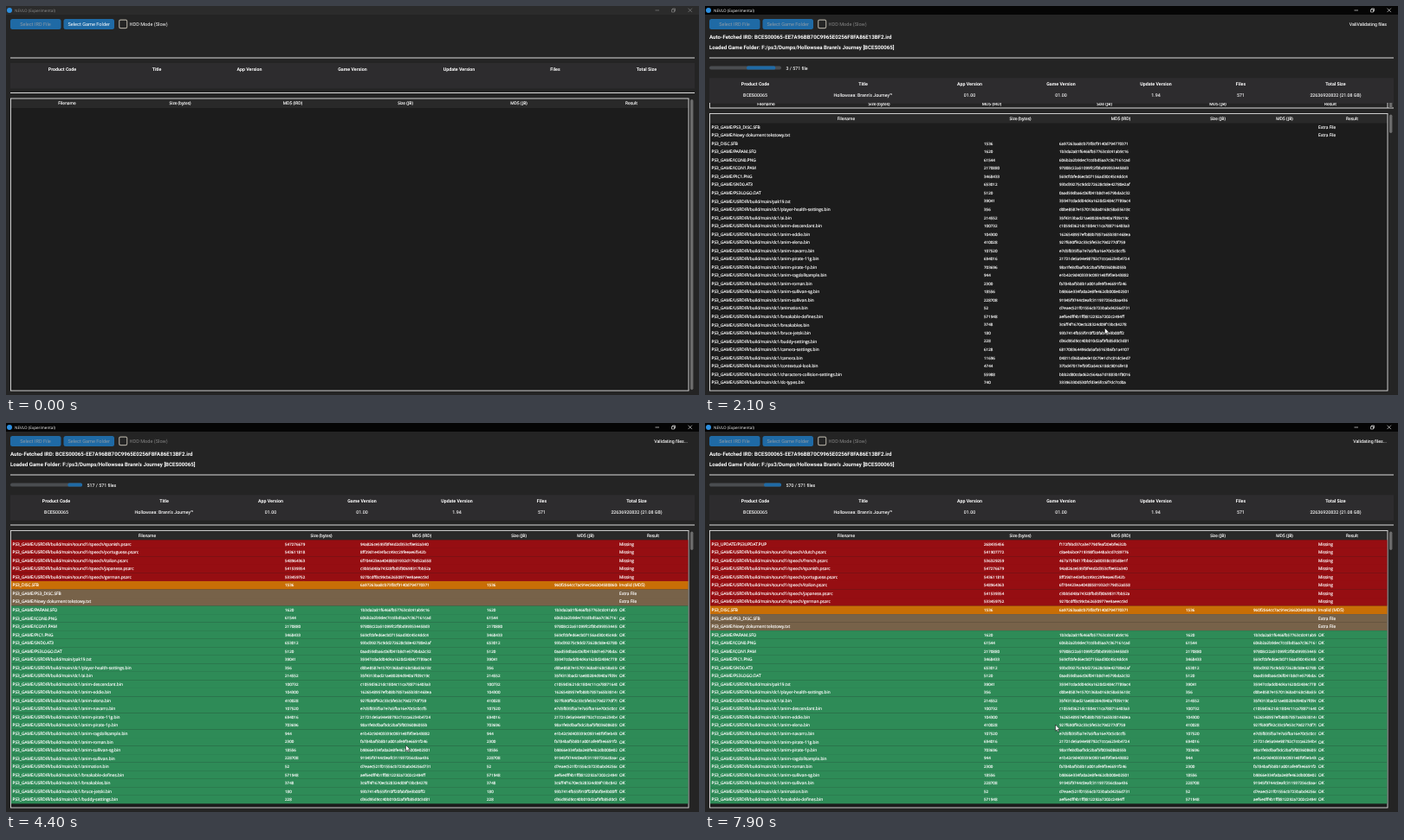
An HTML page for the animation above (8000 ms loop, 800x450 px).

```html
<!DOCTYPE html>
<html lang="en">
<head>
<meta charset="utf-8">
<title>Dump validator</title>
<style>
html, body { margin: 0; width: 100%; height: 100%; overflow: hidden; background: #242424; }
svg.stage { display: block; width: 100vw; height: 100vh; }
text { fill: #fff; text-rendering: geometricPrecision; white-space: pre; }
.ui { font: 5.6px Roboto, sans-serif; }
.small { font: 5.3px Roboto, sans-serif; }
.head { font: bold 5.3px Roboto, sans-serif; }
.info { font: bold 6.15px Roboto, sans-serif; }
.cell { font: 4.8px "Open Sans", "Noto Sans", sans-serif; }
.num { font: 4.52px "Open Sans", "Noto Sans", sans-serif; }
.side { font: 4.6px "Open Sans", "Noto Sans", sans-serif; }
.cell, .num { stroke: #fff; stroke-width: .16px; }
.small { stroke: #fff; stroke-width: .08px; }
.dim { fill: #8c9aa6; }
.grey { fill: #858585; }
.soft { fill: #d0d0d0; }
.mid { text-anchor: middle; }
.end { text-anchor: end; }
.control { fill: #333; }
.unthemed .control { fill: #fff; }
.unthemed .late { display: none; }
</style>
</head>
<body>
<svg class="stage" viewBox="0 0 800 450"></svg>
<script>
const LOOP = 8000, STEP = 100, ROW = 9.53, VISIBLE = 32;
const COLORS = { missing: '#960e12', invalid: '#c86e06', extra: '#776249', ok: '#2e8b57' };
const stage = document.querySelector('svg');

function add(parent, tag, attrs = {}) {
  const el = document.createElementNS('http://www.w3.org/2000/svg', tag);
  for (const key in attrs) el.setAttribute(key, attrs[key]);
  return parent.appendChild(el);
}
const group = (parent, attrs) => add(parent, 'g', attrs);
const box = (parent, x, y, width, height, fill, rx = 0) =>
  add(parent, 'rect', { x, y, width, height, fill, rx });
const path = (parent, d, stroke, width = .6, fill = 'none') =>
  add(parent, 'path', { d, stroke, fill, 'stroke-width': width });

// y is the middle of the capitals
function label(parent, x, y, words, cls) {
  const el = add(parent, 'text', { x, y, dy: '.36em', class: cls });
  el.textContent = words;
  return el;
}
const show = (el, on) => { el.style.display = on ? '' : 'none'; };

// piecewise linear value over time
function at(t, keys) {
  if (t <= keys[0][0]) return keys[0][1];
  for (let i = 1; i < keys.length; i++) {
    const [t0, a] = keys[i - 1], [t1, b] = keys[i];
    if (t <= t1) return a + (b - a) * (t - t0) / (t1 - t0);
  }
  return keys[keys.length - 1][1];
}

// --- window frame and toolbar
box(stage, 0, 0, 800, 450, '#242424');
const titleBar = box(stage, 0, 0, 800, 10, '#2b2b2b');
add(stage, 'circle', { cx: 4, cy: 5, r: 3, fill: '#2d8fe0' });
const titleText = label(stage, 10, 5, 'NEVLO (Experimental)', 'side');
const winButtons = path(stage, 'M749.5 5h4.5M768.5 4h3v3h-3zM769.5 4v-1h3v3h-1M787.5 2.7l4.4 4.4m0-4.4l-4.4 4.4', '#999');

box(stage, 5, 15, 58.5, 12, '#1f6aa5', 2.5);
const folderButton = box(stage, 66.5, 15, 58.5, 12, '#1f6aa5', 2.5);
label(stage, 34, 21, 'Select IRD File', 'ui mid dim');
const folderText = label(stage, 95.7, 21, 'Select Game Folder', 'ui mid');
add(stage, 'rect', { x: 130.7, y: 16.2, width: 9, height: 9.5, rx: 1.6, fill: 'none', stroke: '#a5a197', 'stroke-width': 1.2 });
const hddText = label(stage, 142.5, 21, 'HDD Mode (Slow)', 'ui');

// --- shared layout pieces
const INFO = ['Product Code', 'Title', 'App Version', 'Game Version', 'Update Version', 'Files', 'Total Size'];
const COLUMNS = ['Filename', 'Size (bytes)', 'MD5 (IRD)', 'Size (JB)', 'MD5 (JB)', 'Result'];
const headings = (parent, words, xs, y, cls) => words.forEach((w, i) => label(parent, xs[i], y, w, cls + ' mid'));

function layout(parent, y, infoXs, columnXs) {
  box(parent, 5, 59.5, 790, 1, '#dcdcdc');
  box(parent, 5, y.panel, 790, 29.5, '#2d2c2e');
  headings(parent, INFO, infoXs, y.panel + 7, 'head');
  box(parent, 5, y.line, 790, 1, '#dcdcdc');
  box(parent, 5.5, y.table, 782.5, 445 - y.table, '#1c1c1c');
  box(parent, 5.5, y.table, 782.5, 11, '#292929');
  headings(parent, COLUMNS, columnXs, y.table + 5.7, 'cell');
  add(parent, 'rect', { x: 5.5, y: y.table, width: 782.5, height: 445 - y.table, fill: 'none', stroke: '#dedede', 'stroke-width': .9 });
  box(parent, 790, y.table + 1, 3.4, y.thumb, '#6a6a6a', 1.7);
}

const OLD_COLUMNS = [70.5, 201, 331, 461, 592, 722];
const before = group(stage);
layout(before, { panel: 66, line: 100, table: 107, thumb: 336 },
  [65, 174, 281, 400, 523, 634, 739.5], OLD_COLUMNS);

const after = group(stage);
const INFO_XS = [58, 182.5, 305.5, 411, 520.5, 618.5, 728];
layout(after, { panel: 83.3, line: 117.5, table: 124.5, thumb: 21.5 },
  INFO_XS, [163, 364, 480, 592, 669, 747]);
headings(after, ['BCES00065', 'Hollowsea: Brann\'s Journey™', '01.00', '01.00', '1.94', '571', '22636920832 (21.08 GB)'],
  INFO_XS, 103.5, 'small');
label(after, 5, 36, 'Auto-Fetched IRD: BCES00065-EE7A96BB70C9965E0256F8FA86E13BF2.ird', 'info');
label(after, 5, 48, 'Loaded Game Folder: F:/ps3/Dumps/Hollowsea Brann\'s Journey [BCES00065]', 'info');
const status = label(after, 787, 21, '', 'small end');
box(after, 5, 69.6, 83, 4, '#4a4d50', 2);
const bar = box(after, 5, 69.6, 0, 4, '#1f6aa5', 1.6);
const counter = label(after, 93.5, 71.6, '', 'small');

// stale headings left for a moment while the table moves down
const stale = add(after, 'svg', { x: 0, y: 112, width: 800, height: 6 });
headings(stale, COLUMNS, OLD_COLUMNS, .8, 'cell');
box(stale, 790, 0, 3.4, 6, '#6a6a6a');
path(stale, 'M5.5 0v6M788 0v6', '#dedede', .9);

// --- table rows: name, size, hash
const MAIN = 'PS3_GAME/USRDIR/build/main/';
const parse = (prefix, kind, lines) => lines.trim().split('\n').map(line => {
  const [name, size, hash] = line.trim().split(' ');
  return { name: prefix + name, size, hash, kind };
});

const missing = [
  ...parse('', 'missing', 'PS3_UPDATE/PS3UPDAT.PUP 268435456 f172f9bd37ca3e779dfeaf20ebfe632b'),
  ...parse(MAIN + 'sound1/speech/', 'missing', `
    dutch.psarc 541907772 c8aeb6bce719398f3a448a3cd7c89776
    french.psarc 536329259 467a75f9d17fbb6c2a80338cc85d8e1f
    spanish.psarc 547276679 94a826ce595f8f44d2d353cf9e92a340
    portuguese.psarc 543611818 8ff29d1e434facc49cc29feeae6f542b
    italian.psarc 548964363 6f704423ea40488581932d179d52a558
    japanese.psarc 541539354 c3bb5d48a74328fbd5f80698317bb52a
    german.psarc 533459752 9270cdff8c99cb62650977ee9aeecc9d`)];
const disc = parse('', 'invalid', 'PS3_DISC.SFB 1536 6a97263aa8cb73f8cf9140d794770371');
const extra = ['PS3_DISC.SFB', 'Nowy dokument tekstowy.txt'].map(n => ({ name: 'PS3_GAME/' + n, kind: 'extra' }));
const good = [
  ...parse('PS3_GAME/', 'ok', `
    PARAM.SFO 1620 1b3da2a81f6466fb57763cdc41ab9c16
    ICON0.PNG 61544 606b2a2b9dec7ccdbd5aa7c367161cad
    ICON1.PAM 2170880 97808c22a51099fc2f8bd993534458d3
    PIC1.PNG 3468433 569cfcbfed6ecb07156ad30c45c4ddc4
    SND0.AT3 653012 93bd39275c9dd272628cb8e42780e2af
    PS3LOGO.DAT 5120 0aad59dba6c06f041b8d1e579bda2c32`),
  ...parse(MAIN, 'ok', 'pak19.txt 39041 35947cdadd04d4a1620d2484c7789ac4'),
  ...parse(MAIN + 'dc1/', 'ok', `
    player-health-settings.bin 356 d0be8587e15701368a0168c58a55618c
    ai.bin 214552 35f4313bad21ae80284d940a7fd9c19c
    anim-descendant.bin 100732 c1059d3621dc1804c11ca788716403a3
    anim-eddie.bin 104300 1626548957efb88b7857a65b381468ea
    anim-elena.bin 410028 927f690ff42c33c5fe53c79d277df759
    anim-navarro.bin 107520 e7d5f835f5a7e7a5fba16e70c5c0ccf5
    anim-pirate-11g.bin 694016 21721de5a94e98792c7ccca6234b4724
    anim-pirate-1p.bin 703696 98a1fe8dfaaf3dc2baf5f0036086055b
    anim-ragdollsample.bin 944 e1b42c9d403339c0931e8f9f3eb43882
    anim-roman.bin 2300 fa784baf5b8b1a001afe9f3e6691f246
    anim-sullivan-sg.bin 18556 b9866e334fa0a2e8fe462db000e02501
    anim-sullivan.bin 228708 91945f9744c0eafc311937256c8aa436
    animation.bin 52 d7eaec521f01556cb723babd4256d731
    breakable-defines.bin 571948 aef6edff4b1ff8812292a7202c2494ff
    breakables.bin 3748 3c6ff4f1670ecb28324d09f13bc84278
    bruce-jetski.bin 180 93b7414fb55f910ff20fabf8e3b00ff2
    buddy-settings.bin 228 d36d95d9cc40b010d2af9fb85d0c3d81
    camera-settings.bin 6128 681708364496da5afa5163b6fa1a4107
    camera.bin 11696 04811d360a8ede10c79e1d1c81dc5ed7
    contextual-look.bin 4744 37bd47017ef59f2a54c618dc9016fe18
    characters-collision-settings.bin 55988 bbb2d80cdad62c564aa7d1883b1f8016
    dc-types.bin 740 33396330d530fcfd3e5fcc6f7dc7cd0a`)];
const RESULTS = { missing: 'Missing', invalid: 'Invalid (MD5)', extra: 'Extra File', ok: 'OK' };
const rows = [...missing, ...disc, ...extra, ...good];

for (const row of rows) {
  row.el = group(after);
  row.fill = box(row.el, 6, 0, 781.5, ROW + .1, COLORS[row.kind]);
  const mid = ROW / 2;
  label(row.el, 7.5, mid, row.name, 'cell');
  if (row.size) {
    label(row.el, 322, mid, row.size, 'num');
    label(row.el, 409, mid, row.hash, 'num');
  }
  row.checked = group(row.el);
  if (row.kind === 'ok' || row.kind === 'invalid') {
    label(row.checked, 555, mid, row.size, 'num');
    const cell = add(row.checked, 'svg', { x: 631, y: 0, width: 74.5, height: ROW });
    label(cell, 2, mid, row.kind === 'ok' ? row.hash : '960f2564cc7ac91ec266204580860d1b', 'num');
  }
  label(row.kind === 'extra' ? row.el : row.checked, 708, mid, RESULTS[row.kind], 'cell');
}

function placeRows(t, count) {
  const sorted = t >= 2200;
  const gone = Math.floor(at(t, [[3600, 0], [4600, 7], [5400, 7], [5500, 8]]) + 1e-6);
  const list = t < 1900 ? [] : sorted
    ? [...missing.slice(missing.length - gone), ...disc, ...extra, ...good]
    : [...extra, ...disc, ...good];
  for (const row of rows) {
    const i = list.indexOf(row);
    const done = sorted && (row.kind !== 'ok' || good.indexOf(row) < count - 1);
    show(row.el, i >= 0 && i < VISIBLE);
    row.el.setAttribute('transform', `translate(0 ${135.3 + i * ROW})`);
    show(row.fill, done);
    show(row.checked, done);
  }
}

// --- folder dialog
const dialog = group(stage);
box(dialog, 10.5, 14, 525.5, 362, '#191919');
add(dialog, 'circle', { cx: 17, cy: 21, r: 2.8, fill: '#2d8fe0' });
label(dialog, 22, 21, 'Select Game Folder', 'side');
path(dialog, 'M527.8 19l4 4m0-4l-4 4', '#fff');
const control = (x, y, w, h) => box(dialog, x, y, w, h).setAttribute('class', 'control');
control(10.5, 28, 525.5, 14.5);
add(dialog, 'circle', { cx: 527, cy: 49.5, r: 2.8, fill: '#1683d8' });
label(dialog, 527, 49.5, '?', 'side mid');
[['Nazwa', 82], ['Data modyfikacji', 188], ['Typ', 247], ['Rozmiar', 295]]
  .forEach(([w, x]) => label(dialog, x, 61.5, w, 'side soft'));
path(dialog, 'M185 57v9M244.5 57v9M292.5 57v9M325 57v9', '#555', .5);
box(dialog, 83, 70, 5.5, 6, '#d9b860', .5);
label(dialog, 91, 73, 'PS3_GAME', 'side');
label(dialog, 188, 73, '20.08.2025 18:15', 'side soft');
label(dialog, 247, 73, 'Folder plików', 'side soft');
box(dialog, 11, 298.5, 63, 10, '#555');

const sideItems = (y, names) => names.forEach((name, i) => {
  const cy = y + i * 10.1;
  box(dialog, 24.3, cy - 2.8, 4.6, 5.6, '#d0d0d0', .4);
  label(dialog, 32, cy, name, 'side');
});
const sideRoot = (y, name, color) => {
  box(dialog, 20.5, y - 2.5, 6, 5, color, 1);
  label(dialog, 28.5, y, name, 'side');
};
label(dialog, 28.5, 67.5, 'Szybki dostęp', 'side');
sideItems(78, ['Pulpit', 'Pobrane', 'Dokumenty', 'Obrazy', 'ROMy,Zarty (E:', 'Nimbox Drive', 'log', 'bzz', 'zbiorek', 'rysownik9', 'wii']);
for (let i = 0; i < 7; i++) path(dialog, `M69 ${79.5 + i * 10.1}l3-3m-2 0l2 2`, '#bbb', .6);
sideRoot(192, 'Ten komputer', '#3b9be0');
sideItems(202.4, ['Dokumenty', 'Muzyka', 'Obiekty 3D', 'Obrazy', 'Pobrane', 'Pulpit', 'Wideo', 'Dysk lokalny (C:)', 'Gry (D:)', 'ROMy,Zarty (E:)', 'Proper Titles (F:)', 'depot (\\\\NAS2000) (Z']);
sideRoot(327, 'Sieć', '#3b9be0');
box(dialog, 74.5, 309, 15, 9, '#191919');

box(dialog, 10.5, 344.5, 525.5, 31.5, '#2b2b2b');
control(63, 349.5, 15, 7);
control(80.5, 348, 448, 10);
control(442, 360, 47, 11);
control(493, 360, 36, 11);
control(529, 369, 7, 7);
label(dialog, 465, 365.5, 'Wybierz folder', 'side mid late');
label(dialog, 511, 365.5, 'Anuluj', 'side mid late');

// --- pointer
const pointer = group(stage);
path(pointer, 'M0 0V7.2L1.7 5.7L2.9 8.3L4 7.8L2.9 5.3H5.1Z', '#000', .5, '#fff');
const POINTER_X = [[100, 168], [600, 97], [750, 97], [1000, 209.7], [1100, 209.7], [1500, 461.5], [7300, 461.5], [7800, 404.5]];
const POINTER_Y = [[100, 172], [600, 21], [750, 21], [1000, 137], [1100, 137], [1500, 372.5], [7300, 372.5], [7800, 349]];

// unwrapped angle of the swinging progress segment, in degrees
const SWING = [[1800, -28], [2100, 26], [3200, 217], [4900, 549], [6200, 833], [7900, 1147]];
const COUNT = [[1900, 0], [2100, 3], [3200, 116], [3600, 160], [4500, 562], [4900, 566], [5400, 567], [6200, 569], [6900, 569], [7000, 570]];

function draw(t) {
  const loaded = t >= 1800;
  const active = (t >= 200 && t < 1000) || t >= 1700;
  const ink = active ? '#fff' : '#8f8f8f';
  titleBar.setAttribute('fill', active ? '#050505' : '#2b2b2b');
  titleText.style.fill = ink;
  winButtons.setAttribute('stroke', ink);

  folderButton.setAttribute('fill', t >= 500 && t < 900 ? '#144870' : '#1f6aa5');
  folderText.classList.toggle('dim', loaded);
  hddText.classList.toggle('grey', loaded);
  show(before, !loaded);
  show(after, loaded);

  const count = Math.floor(at(t, COUNT) + 1e-6);
  const settling = t >= 2000 && t < 2200;
  show(stale, settling);
  status.textContent = settling ? 'ValiValidating files' : 'Validating files...';
  counter.textContent = `${count} / 571 file${settling ? '' : 's'}`;
  placeRows(t, count);

  const p = (Math.sin(at(t, SWING) * Math.PI / 180) + 1) / 2;
  const from = Math.max(0, p - .2), to = Math.min(1, p + .2);
  bar.setAttribute('x', 5 + 83 * from);
  bar.setAttribute('width', 83 * (to - from));

  show(dialog, t >= 1000 && t < 1700);
  dialog.setAttribute('opacity', t === 1000 || t === 1600 ? .47 : 1);
  dialog.setAttribute('class', t === 1000 ? 'unthemed' : '');

  show(pointer, t >= 100);
  pointer.setAttribute('transform', `translate(${at(t, POINTER_X)} ${at(t, POINTER_Y)})`);
}

let last = -1;
const start = performance.now();
function tick() {
  const t = Math.floor((performance.now() - start) % LOOP / STEP) * STEP;
  if (t !== last) draw(last = t);
  requestAnimationFrame(tick);
}
tick();
</script>
</body>
</html>
```
